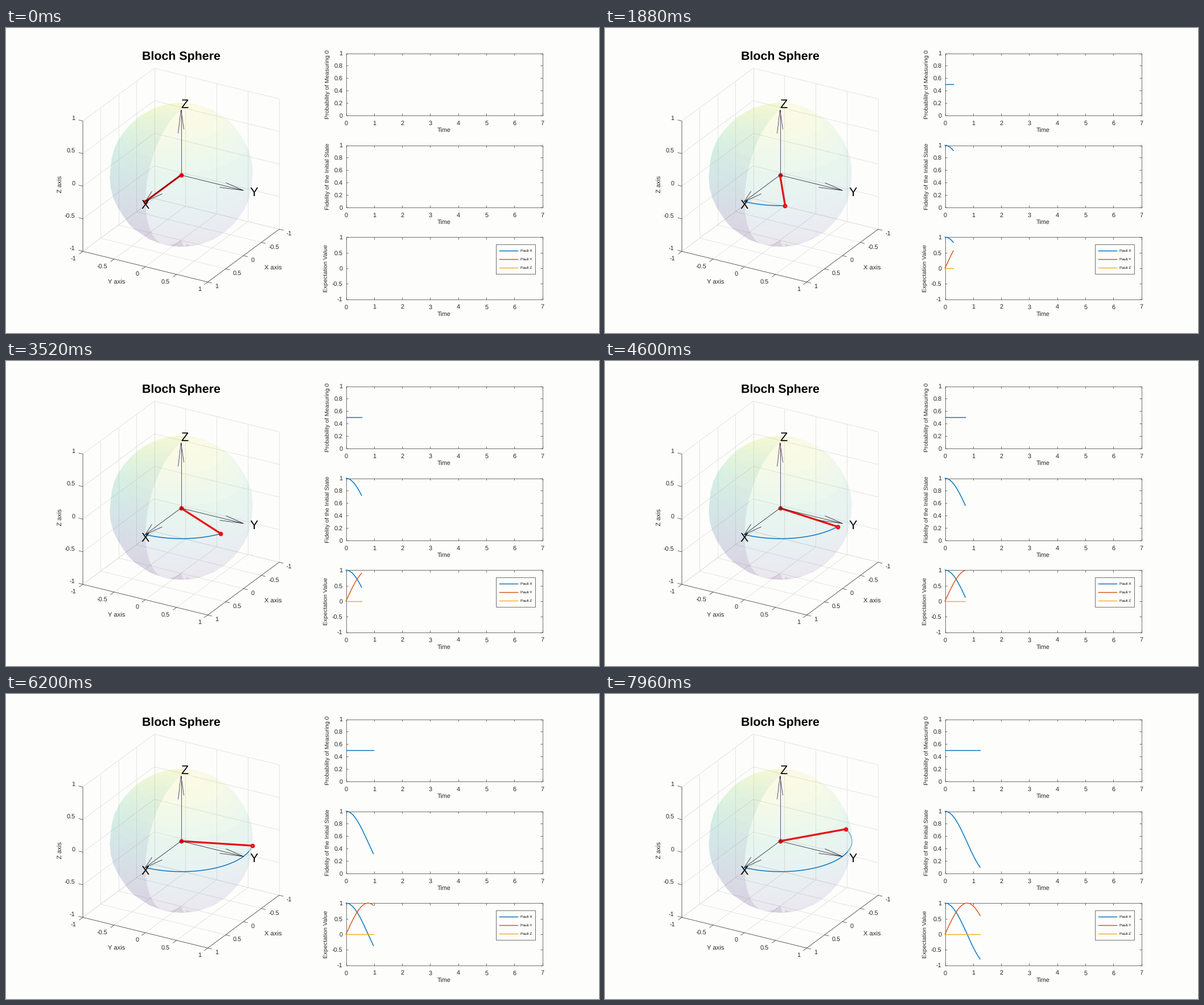
Recreate the animation shown at these times as a matplotlib script. Size 1042 by 537 pixels, loop 8 s.

```python
import numpy as np
import matplotlib.pyplot as plt
from matplotlib.animation import FuncAnimation
from matplotlib.collections import LineCollection
from matplotlib.patches import Rectangle

W, H, DPI = 1042, 537, 100
PX = 72 / DPI
FRAMES, INTERVAL = 200, 40
DT = 2 * np.pi / 1000

BG, INK, GRID = "#fdfdfc", "#262626", "#dedede"
BLUE, ORANGE, YELLOW, RED = "#0072bd", "#d95319", "#edb120", "#e81014"
TICKS = (-1, -0.5, 0, 0.5, 1)
THIN, CURVE = 0.65, 1.45

plt.rcParams["font.family"] = "Liberation Sans"
plt.rcParams["text.hinting"] = "none"

fig = plt.figure(figsize=(W / DPI, H / DPI), dpi=DPI, facecolor=BG)
ax = fig.add_axes([0, 0, 1, 1])
ax.axis("off")


def project(x, y, z):
    """Orthographic view of the unit cube in stage pixels."""
    return (308 - 62.75 * x + 109.75 * y,
            259.5 + 46.5 * x + 27 * y - 114.75 * z)


def text(x, y, s, size=10.9, ha="center", color=INK, rotation=0, **kw):
    """Place text so that its capitals are centred on (x, y)."""
    shift = 0.36 * size
    dx, dy = (shift, 0) if rotation else (0, shift)
    ax.text(x + dx, y + dy, s, fontsize=size * PX, ha=ha, va="baseline",
            color=color, rotation=rotation, rotation_mode="anchor",
            zorder=10, **kw)


def segments(lines, color, width, zorder):
    ax.add_collection(LineCollection(lines, colors=color,
                                     linewidths=width * PX, zorder=zorder))


def curve(color, width, zorder, **kw):
    return ax.plot([], [], color=color, lw=width * PX, zorder=zorder, **kw)[0]


def sphere_image(left, top, size, n=20, alpha=0.1, ss=2):
    """Translucent faceted sphere, painted in mesh order with a depth test."""
    dim = size * ss
    color = np.zeros((dim, dim, 3))
    cover = np.zeros((dim, dim, 1))
    depth = np.full((dim, dim), -1e9)
    theta = np.linspace(0, 2 * np.pi, n + 1)
    phi = np.linspace(-np.pi / 2, np.pi / 2, n + 1)
    th, ph = np.meshgrid(theta, phi)
    x, y, z = np.cos(ph) * np.cos(th), np.cos(ph) * np.sin(th), np.sin(ph)
    sx, sy = project(x, y, z)
    toward = 126.4 * (0.788 * x + 0.451 * y + 0.419 * z)
    verts = np.dstack([(sx - left) * ss, (sy - top) * ss, toward])
    cmap = plt.get_cmap("viridis")

    for j in range(n):
        for i in range(n):
            quad = np.array([verts[i, j], verts[i, j + 1],
                             verts[i + 1, j + 1], verts[i + 1, j]])
            normal = np.cross(quad[2] - quad[0], quad[3] - quad[1])
            if abs(normal[2]) < 1e-6:
                continue
            x0, y0 = np.maximum(np.floor(quad[:, :2].min(0)).astype(int), 0)
            x1, y1 = np.ceil(quad[:, :2].max(0)).astype(int) + 1
            box = np.s_[y0:y1, x0:x1]
            rows, cols = depth[box].shape
            gx, gy = np.meshgrid(x0 + np.arange(cols) + 0.5,
                                 y0 + np.arange(rows) + 0.5)
            hit = np.ones((rows, cols), bool)
            for a, b in zip(quad, np.roll(quad, -1, axis=0)):
                side = (b[0] - a[0]) * (gy - a[1]) - (b[1] - a[1]) * (gx - a[0])
                hit &= side * np.sign(normal[2]) >= 0
            d = quad[0, 2] - (normal[0] * (gx - quad[0, 0])
                              + normal[1] * (gy - quad[0, 1])) / normal[2]
            hit &= d > depth[box]
            depth[box][hit] = d[hit]
            face = np.array(cmap((z[i, j] + 1) / 2)[:3])
            color[box][hit] = face * alpha + color[box][hit] * (1 - alpha)
            cover[box][hit] = alpha + cover[box][hit] * (1 - alpha)

    def shrink(a):
        return a.reshape(size, ss, size, ss, -1).mean((1, 3))

    color, cover = shrink(color), shrink(cover)
    return np.dstack([np.clip(color / np.maximum(cover, 1e-6), 0, 1), cover])


def draw_cube():
    grid = []
    for t in TICKS:
        grid += [((-1, t, -1), (-1, t, 1)), ((-1, -1, t), (-1, 1, t)),
                 ((t, -1, -1), (t, -1, 1)), ((-1, -1, t), (1, -1, t)),
                 ((t, -1, -1), (t, 1, -1)), ((-1, t, -1), (1, t, -1))]
    segments([[project(*a), project(*b)] for a, b in grid], GRID, 0.8, 1)

    corners = [(1, -1, 1), (1, -1, -1), (1, 1, -1), (-1, 1, -1)]
    edges = [[project(*p) for p in corners]]
    for t in TICKS:
        name = f"{t:g}"
        for point, tick, offset, ha in (
                ((1, -1, t), (-7.5, -1.9), (-13.5, -5.8), "right"),
                ((1, t, -1), (-6.3, 4.7), (-11.5, 12), "right"),
                ((t, 1, -1), (7.5, 1.9), (13, 7), "left")):
            x, y = project(*point)
            edges.append([(x, y), (x + tick[0], y + tick[1])])
            text(x + offset[0], y + offset[1], name, ha=ha)
    segments(edges, INK, THIN, 2)

    text(195, 447, "Y axis", 11.2)
    text(470, 422, "X axis", 11.2)
    text(95, 275, "Z axis", 11.2, rotation=90)
    text(308, 48.5, "Bloch Sphere", 21.4, color="black", weight="bold")


def draw_arrows():
    origin = project(0, 0, 0)
    arrows = (((1, 0, 0), (257, 288), (275, 292.5), "#14141f"),
              ((0, 1, 0), (376, 281), (387, 273), "#14141f"),
              ((0, 0, 1), (303, 186), (313, 179), "#241f52"))
    for axis, barb_a, barb_b, color in arrows:
        tip = project(*axis)
        segments([[origin, tip], [barb_a, tip, barb_b]], color, 0.75, 6.5)
    for x, y, s in ((238.5, 310.5, "X"), (429, 289, "Y"), (308, 134, "Z")):
        text(x, y, s, 21.6, ha="left", color="black")


class Panel:
    """Plot frame with a time axis from 0 to 7."""

    left, right, height = 598, 943.3, 109.3

    def __init__(self, top, low, step, label, label_x):
        self.top, self.low = top, low
        bottom = top + self.height
        ax.add_patch(Rectangle((self.left, top), self.right - self.left,
                               self.height, fill=False, ec=INK, lw=THIN * PX,
                               zorder=6))
        marks = []
        for t in range(8):
            x = self.x(t)
            marks += [[(x, bottom), (x, bottom - 3.5)],
                      [(x, top), (x, top + 3.5)]]
            text(x, bottom + 13, str(t))
        for v in np.arange(low, 1 + step / 2, step):
            y = self.y(v)
            marks += [[(self.left, y), (self.left + 3.5, y)],
                      [(self.right, y), (self.right - 3.5, y)]]
            text(592, y, f"{round(v, 1) + 0.0:g}", ha="right")
        segments(marks, INK, THIN, 6)
        text(770.5, bottom + 26.5, "Time")
        text(label_x, top + self.height / 2, label, 10.5, rotation=90)

    def x(self, t):
        return self.left + t * (self.right - self.left) / 7

    def y(self, v):
        return self.top + (1 - v) / (1 - self.low) * self.height


def draw_legend():
    ax.add_patch(Rectangle((861, 381), 69.5, 52, fc=BG, ec=INK,
                           lw=THIN * PX, zorder=8))
    for k, (s, color) in enumerate(zip("XYZ", (BLUE, ORANGE, YELLOW))):
        y = 392 + 15.2 * k
        ax.plot([867, 899], [y, y], color=color, lw=CURVE * PX, zorder=9)
        text(905, y, "Pauli " + s, 6.5, ha="left", color="black")


draw_cube()
ax.imshow(sphere_image(178, 130, 260), extent=(178, 438, 390, 130),
          interpolation="nearest", aspect="auto", zorder=3)
draw_arrows()
prob = Panel(45, 0, 0.2, "Probability of Measuring 0", 565)
fidelity = Panel(207, 0, 0.2, "Fidelity of the Initial State", 565)
pauli = Panel(368.7, -1, 0.5, "Expectation Value", 561.5)
draw_legend()

time = np.arange(FRAMES) * DT
angle = 2 * time
px, py = np.cos(angle), np.sin(angle)
flat = np.zeros(FRAMES)
orbit_x, orbit_y = project(px, py, flat)

plots = [(panel, values, curve(color, CURVE, 7)) for panel, values, color in (
    (prob, flat + 0.5, BLUE), (fidelity, (1 + px) / 2, BLUE),
    (pauli, px, BLUE), (pauli, py, ORANGE), (pauli, flat, YELLOW))]

# The far part of the orbit grazes the surface and looks broken up.
near = int(np.searchsorted(angle, np.radians(100)))
trail = curve(BLUE, CURVE, 5)
far_trail = curve(BLUE, 1.3, 5, ls=(0, (1.6, 0.6)), alpha=0.85)
state = curve(RED, 3.3, 6, marker="o", ms=4.6 * PX, mfc="none", mec=RED,
              mew=3.2 * PX, solid_capstyle="butt")

# Stage coordinates name pixel edges; the view is set half a pixel in.
ax.set_xlim(0.5, W + 0.5)
ax.set_ylim(H + 0.5, 0.5)


def draw(i):
    end = i + 1
    for panel, values, line in plots:
        line.set_data(panel.x(time[:end]), panel.y(values[:end]))
    split = min(end, near)
    trail.set_data(orbit_x[:split], orbit_y[:split])
    far_trail.set_data(orbit_x[near - 1:end], orbit_y[near - 1:end])
    state.set_data([308, orbit_x[i]], [259.5, orbit_y[i]])
    return [line for _, _, line in plots] + [trail, far_trail, state]


anim = FuncAnimation(fig, draw, frames=FRAMES, interval=INTERVAL,
                     repeat=True, repeat_delay=0)
plt.show()
```
